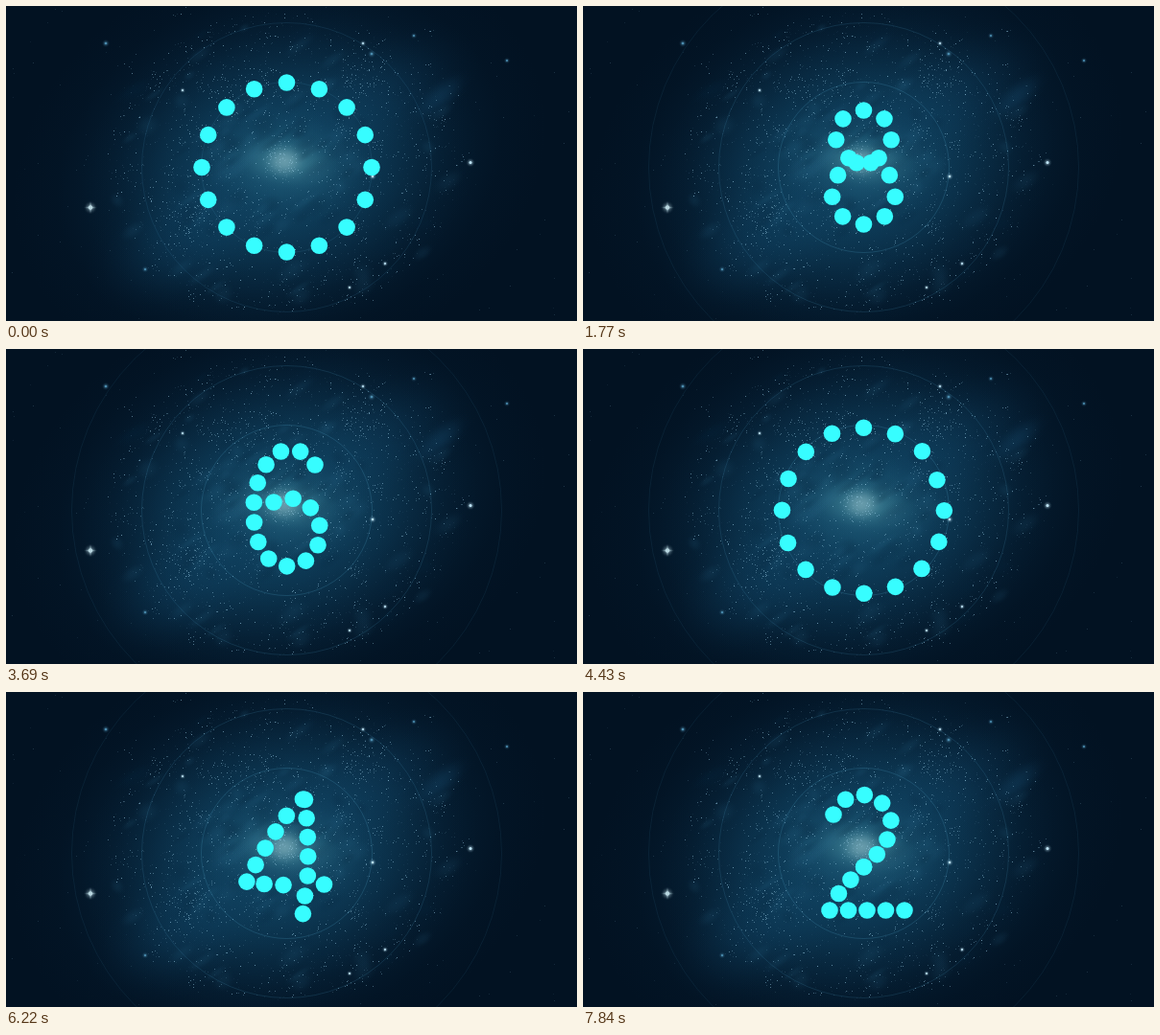
An HTML page with a canvas that plays this animation: 595x329 px, repeating every 8000 ms.

```html
<!DOCTYPE html>
<html lang="en">
<head>
<meta charset="utf-8">
<title>Countdown</title>
<style>
  html, body { margin: 0; width: 100%; height: 100%; overflow: hidden; background: #021222; }
  canvas { position: absolute; left: 0; top: 0; width: 595px; height: 329px; }
</style>
</head>
<body>
<canvas id="sky" width="595" height="329"></canvas>
<canvas id="dots" width="595" height="329"></canvas>
<script>
const W = 595, H = 329, CX = 292.5, CY = 168.5, TAU = Math.PI * 2;
const LOOP = 8000, TICK = 148, COUNT = 16;

const sky = document.getElementById('sky').getContext('2d');
const ctx = document.getElementById('dots').getContext('2d');

// ---------- background ----------
let seed = 71;
const rand = () => (seed = (seed * 16807) % 2147483647) / 2147483647;
const gauss = () => rand() + rand() + rand() + rand() - 2;

function glow(x, y, rx, ry, turn, rgb, alpha) {
  sky.save();
  sky.translate(x, y);
  sky.rotate(turn);
  sky.scale(rx, ry);
  const g = sky.createRadialGradient(0, 0, 0, 0, 0, 1);
  for (let i = 0; i <= 6; i++) {
    const fade = (1 + Math.cos(Math.PI * i / 6)) / 2;
    g.addColorStop(i / 6, `rgba(${rgb},${alpha * fade})`);
  }
  sky.fillStyle = g;
  sky.fillRect(-1, -1, 2, 2);
  sky.restore();
}

function speck(x, y, alpha) {
  sky.fillStyle = `rgba(150,200,225,${alpha})`;
  sky.fillRect(Math.round(x), Math.round(y), 1, 1);
}

function star(x, y, r, rgb = '190,228,245') {
  glow(x, y, r * 2.4, r * 2.4, 0, rgb, 0.5);
  sky.fillStyle = `rgb(${rgb})`;
  sky.beginPath();
  sky.arc(x, y, r * 0.75, 0, TAU);
  sky.fill();
}

function cluster(x, y, spread, n) {
  for (let i = 0; i < n; i++) speck(x + gauss() * spread, y + gauss() * spread, 0.1 + rand() * 0.45);
}

function paintSky() {
  sky.fillStyle = '#021222';
  sky.fillRect(0, 0, W, H);

  // haze, then core
  glow(285, 165, 285, 220, -0.35, '14,62,94', 0.72);
  glow(285, 168, 210, 165, -0.3, '20,80,112', 0.6);
  glow(185, 245, 110, 70, -0.5, '18,76,112', 0.3);
  glow(385, 95, 120, 65, -0.5, '18,72,108', 0.22);
  glow(452, 95, 40, 17, -0.7, '26,84,122', 0.3);
  glow(292, 164, 95, 60, 0.1, '50,120,145', 0.4);
  glow(292, 162, 58, 30, 0.1, '80,150,165', 0.5);
  glow(290, 162, 24, 20, 0, '150,190,200', 0.5);

  // mottled dust
  for (let i = 0; i < 110; i++) {
    const a = rand() * TAU, d = 25 + rand() * 145, dark = rand() < 0.5;
    glow(285 + Math.cos(a) * d * 1.1, 167 + Math.sin(a) * d * 0.9, 8 + rand() * 18, 5 + rand() * 9, -0.6,
      dark ? '5,36,60' : '45,110,145', dark ? 0.2 : 0.13);
  }

  // star field: fine grain, clumps, far stars
  for (let i = 0; i < 1500; i++) {
    const a = rand() * TAU, d = 30 + Math.sqrt(rand()) * 140;
    speck(288 + Math.cos(a) * d * 1.08, 164 + Math.sin(a) * d * 0.93, 0.05 + rand() ** 3 * 0.6);
  }
  for (let i = 0; i < 120; i++) cluster(CX + gauss() * 150, 165 + gauss() * 125, 9, 6);
  for (let i = 0; i < 130; i++) speck(rand() * W, rand() * H, 0.06 + rand() * 0.14);
  cluster(372, 72, 24, 70);
  cluster(252, 88, 24, 65);
  cluster(190, 215, 28, 90);
  cluster(290, 162, 17, 70);

  star(484, 163.5, 2);
  star(382, 178, 1.7);
  star(372, 39, 1.4);
  star(395, 269, 1.4);
  star(358, 294, 1.3);
  star(184, 88, 1.3);
  const blue = '75,140,175';
  star(104, 39, 1.8, blue);
  star(381, 50, 1.8, blue);
  star(425, 31, 1.4, blue);
  star(522, 57, 1.4, blue);
  star(145, 275, 1.5, blue);

  // flared star
  glow(88, 210.5, 7, 1.8, 0, '190,225,235', 0.7);
  glow(88, 210.5, 1.8, 7, 0, '190,225,235', 0.7);
  star(88, 210.5, 2.9, '185,215,225');
}

// ---------- digits ----------
const pen = document.createElementNS('http://www.w3.org/2000/svg', 'path');

// n points evenly spaced along a path
function trace(n, d) {
  pen.setAttribute('d', d);
  const step = pen.getTotalLength() / (n - 1);
  return Array.from({ length: n }, (_, i) => {
    const { x, y } = pen.getPointAtLength(i * step);
    return [x, y];
  });
}

// Gives dots to ring slots, from a first slot clockwise (1) or back (-1)
function shape(first, dir, ...strokes) {
  const out = [];
  strokes.flat().forEach((p, i) => { out[(first + dir * i + COUNT) % COUNT] = p; });
  return out;
}

const ring = Array.from({ length: COUNT }, (_, i) => {
  const a = i / COUNT * TAU;
  return [CX + 88.5 * Math.sin(a), CY - 88.5 * Math.cos(a)];
});

const six = shape(2, -1, trace(16, 'M322 121A38.5 64.5 0 0 0 262 198A33 35.5 0 1 0 279 160'));
const nine = six.map((_, i) => {
  const [x, y] = six[(i + COUNT / 2) % COUNT];
  return [584 - x, 341 - y];
});

const half = trace(9, 'M292.5 109A29 27 0 0 1 292.5 163A33 32.5 0 0 1 292.5 228');
const eight = shape(0, 1, half, half.slice(1, 8).reverse().map(([x, y]) => [2 * CX - x, y]));

const leg = trace(6, 'M317 133Q292 175 284 227');
const seven = shape(14, 1, trace(4, 'M260 114.5H323'), leg, [leg[5]], leg.slice(1).reverse());

const five = shape(2, -1,
  trace(7, 'M330 119L271 111L257.5 166'), trace(9, 'M254 205A35 32 0 1 0 292 167'));

const stem = trace(7, 'M310.5 114V230');
const four = shape(0, 1,
  [stem[0]], stem.slice(0, 5), [[330, 199]], stem.slice(5), trace(7, 'M291 198.5H253L294.5 132'));

const three = shape(14, 1,
  trace(14, 'M262 126A30 28 0 1 1 294 162A36 35 0 1 1 254 208'), [[277, 163], [277, 163]]);

const slope = trace(6, 'M317 154C312 172 270 195 257 227');
const two = shape(14, 1,
  trace(6, 'M261 128A31 31 0 1 1 317 154'), slope.slice(1, 3),
  trace(5, 'M335 228H257'), slope.slice(2, 5).reverse());

// ---------- timeline ----------
const moves = [];
const move = (start, dur, from, to) => moves.push({ start, dur, from, to });
const swap = (start, dur, from, to) => {
  move(start, dur, from, ring);
  move(start + dur, dur, ring, to);
};
move(10, 640, ring, nine);
swap(890, 390, nine, eight);
[eight, seven, six, five, four, three, two].forEach((digit, i, all) => {
  if (i) swap(2008 + 1039 * (i - 1), 300, all[i - 1], digit);
});

const clamp = u => Math.max(0, Math.min(1, u));
const ease = u => u < 0.5 ? 2 * u * u : 1 - 2 * (1 - u) ** 2;

function drawOrbit(r, alpha) {
  ctx.strokeStyle = `rgba(75,150,185,${alpha})`;
  ctx.beginPath();
  ctx.arc(CX, CY, r, 0, TAU);
  ctx.stroke();
}

function draw(t) {
  ctx.clearRect(0, 0, W, H);
  const lit = clamp((t - 10) / 640);
  drawOrbit(89, 0.16 + 0.1 * lit);
  drawOrbit(151, 0.15 + 0.04 * lit);
  drawOrbit(224, 0.11 * lit);

  const m = moves.filter(v => v.start <= t).pop() || moves[0];
  const p = ease(clamp((t - m.start) / m.dur));
  ctx.fillStyle = '#37fdff';
  m.from.forEach(([x, y], i) => {
    const [x2, y2] = m.to[i];
    ctx.beginPath();
    ctx.arc(x + (x2 - x) * p, y + (y2 - y) * p, 8.8, 0, TAU);
    ctx.fill();
  });
}

// Playback advances in even ticks, about seven a second
const begin = performance.now();
function run() {
  const t = (performance.now() - begin) % LOOP;
  draw(Math.floor((t + 15) / TICK) * TICK);
  requestAnimationFrame(run);
}

paintSky();
run();
</script>
</body>
</html>
```
